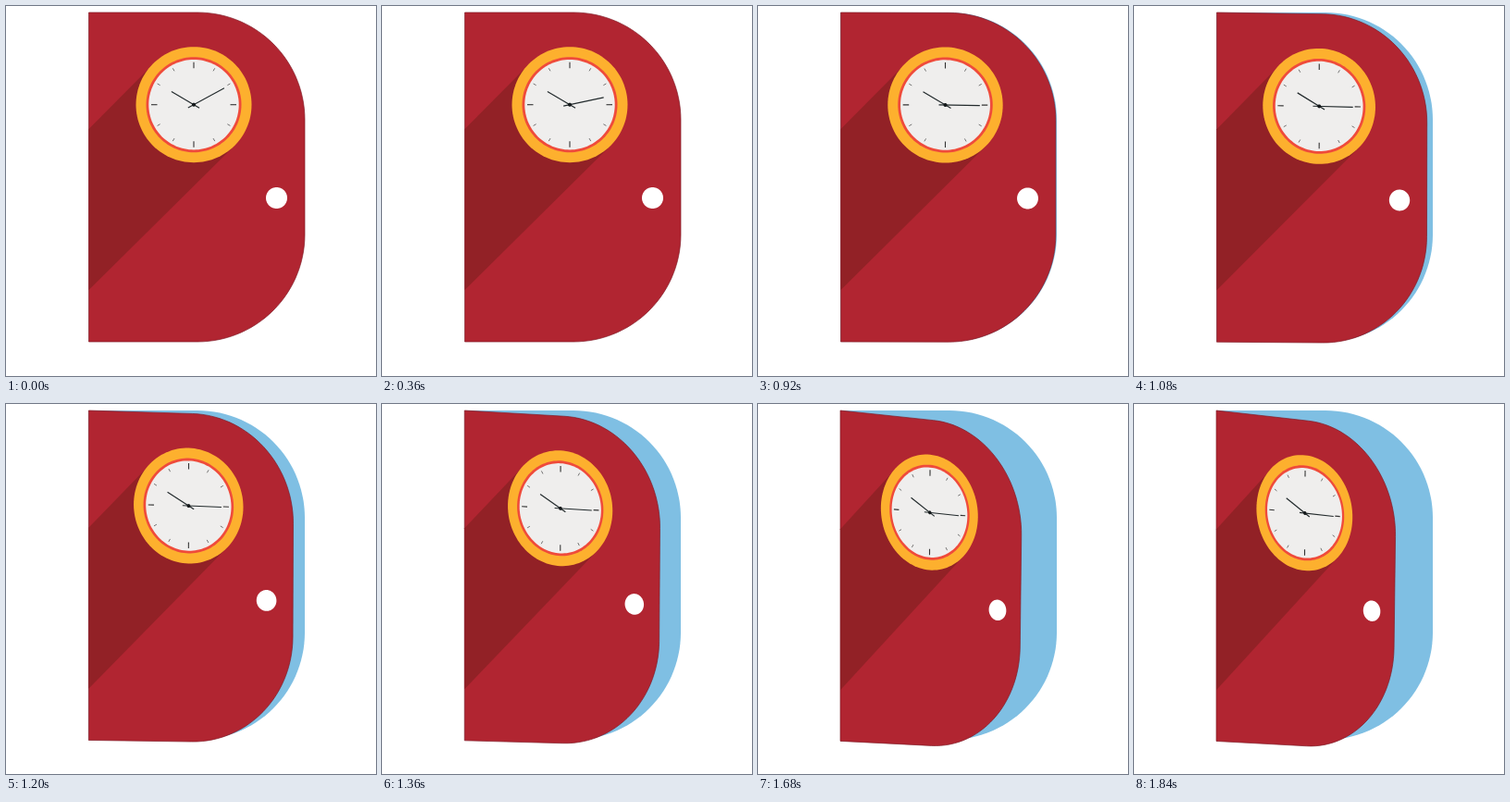
Animation, 400 px wide and 400 px high, one loop 3.2 s. Source, as an HTML page with a canvas:

```html
<!DOCTYPE html>
<html lang="en">
<head>
<meta charset="utf-8">
<title>Clock door</title>
<style>
  html, body { margin: 0; width: 100%; height: 100%; overflow: hidden; background: #fff; }
  canvas { display: block; width: 400px; height: 400px; }
</style>
</head>
<body>
<canvas id="stage"></canvas>
<script>
const LOOP = 3200, STEP = 40;
const BOX = { x: 89.5, y: 7, w: 233.5, h: 356, r: 116 };
const CLOCK = { x: 203, y: 106.7 };

// Door corners, clockwise from the top left
const SHUT = [[89.5, 7], [323, 7], [323, 363], [89.5, 363]];
const OPEN = [[89, 7], [284, 29], [279.7, 374.8], [89, 364.5]];

const canvas = document.getElementById('stage');
const ctx = canvas.getContext('2d');
const dpr = window.devicePixelRatio || 1;
canvas.width = canvas.height = 400 * dpr;
ctx.scale(dpr, dpr);

const clamp = v => Math.max(0, Math.min(1, v));
const mix = (a, b, k) => a + (b - a) * k;
const flat = (x, y) => [x, y];

// Cubic bezier timing (.4, 0, .61, 1)
function ease(t) {
  let lo = 0, hi = 1;
  for (let i = 0; i < 24; i++) {
    const s = (lo + hi) / 2, q = 1 - s;
    if (3 * .4 * s * q * q + 3 * .61 * s * s * q + s * s * s < t) lo = s;
    else hi = s;
  }
  return lo * lo * (3 - 2 * lo);
}

// Perspective map from the shut door's box onto a quad
function projector([[x0, y0], [x1, y1], [x2, y2], [x3, y3]]) {
  const sx = x0 - x1 + x2 - x3, sy = y0 - y1 + y2 - y3;
  const ax = x1 - x2, ay = y1 - y2, bx = x3 - x2, by = y3 - y2;
  const det = ax * by - bx * ay;
  const g = (sx * by - bx * sy) / det, h = (ax * sy - sx * ay) / det;
  return (x, y) => {
    const u = (x - BOX.x) / BOX.w, v = (y - BOX.y) / BOX.h;
    const w = g * u + h * v + 1;
    return [
      ((x1 - x0 + g * x1) * u + (x3 - x0 + h * x3) * v + x0) / w,
      ((y1 - y0 + g * y1) * u + (y3 - y0 + h * y3) * v + y0) / w
    ];
  };
}

function arc(x, y, r, from = 0, to = 360) {
  const pts = [];
  for (let a = from; a <= to; a += 3) {
    const k = a * Math.PI / 180;
    pts.push([x + r * Math.cos(k), y + r * Math.sin(k)]);
  }
  return pts;
}

const right = BOX.x + BOX.w, bottom = BOX.y + BOX.h;
const DOOR = [
  [BOX.x, BOX.y],
  ...arc(right - BOX.r, BOX.y + BOX.r, BOX.r, -90, 0),
  ...arc(right - BOX.r, bottom - BOX.r, BOX.r, 0, 90),
  [BOX.x, bottom]
];
const SHADOW = [[BOX.x, 133], [159, 63], [247, 151], [BOX.x, 307]];

function trace(map, pts) {
  ctx.beginPath();
  for (const p of pts) ctx.lineTo(...map(...p));
}

function fill(map, pts, color) {
  trace(map, pts);
  ctx.closePath();
  ctx.fillStyle = color;
  ctx.fill();
}

// Line through the clock's centre at a clock angle, between two radii
function spoke(map, deg, from, to, width, color = '#222a2c') {
  const a = deg * Math.PI / 180, s = Math.sin(a), c = Math.cos(a);
  trace(map, [from, to].map(r => [CLOCK.x + r * s, CLOCK.y - r * c]));
  ctx.lineWidth = width;
  ctx.strokeStyle = color;
  ctx.stroke();
}

function drawClock(map, minute) {
  const disc = (r, color) => fill(map, arc(CLOCK.x, CLOCK.y, r), color);
  disc(62.5, '#fdb02e');
  disc(51.5, '#ef4b3b');
  disc(48.7, '#efeeed');
  for (let i = 0; i < 12; i++) {
    if (i % 3) spoke(map, i * 30, 42, 45.5, .8, '#555');
    else spoke(map, i * 30, 39.5, 46, 1.1, '#333');
  }
  spoke(map, 300.5, -7, 28, 1.2);
  spoke(map, minute, -7, 37.5, 1.1);
  disc(2, '#14191b');
}

function draw(time) {
  const tick = Math.floor(time % LOOP / STEP);
  const swing = ease(clamp((tick - 20) / 26));
  const minute = mix(61.5, 90.8, clamp(tick / 16));
  const map = projector(SHUT.map((p, i) => p.map((v, j) => mix(v, OPEN[i][j], swing))));

  ctx.fillStyle = '#fff';
  ctx.fillRect(0, 0, 400, 400);
  if (tick > 20) fill(flat, DOOR, '#7fbfe3');
  fill(map, DOOR, '#b12531');
  fill(map, SHADOW, '#922126');
  trace(map, DOOR);
  ctx.closePath();
  ctx.lineWidth = .7;
  ctx.strokeStyle = '#821c27';
  ctx.stroke();
  drawClock(map, minute);
  fill(map, arc(292.5, 207.5, 11.5), '#fff');
}

const start = performance.now();
function frame() {
  draw(performance.now() - start);
  requestAnimationFrame(frame);
}
frame();
</script>
</body>
</html>
```
